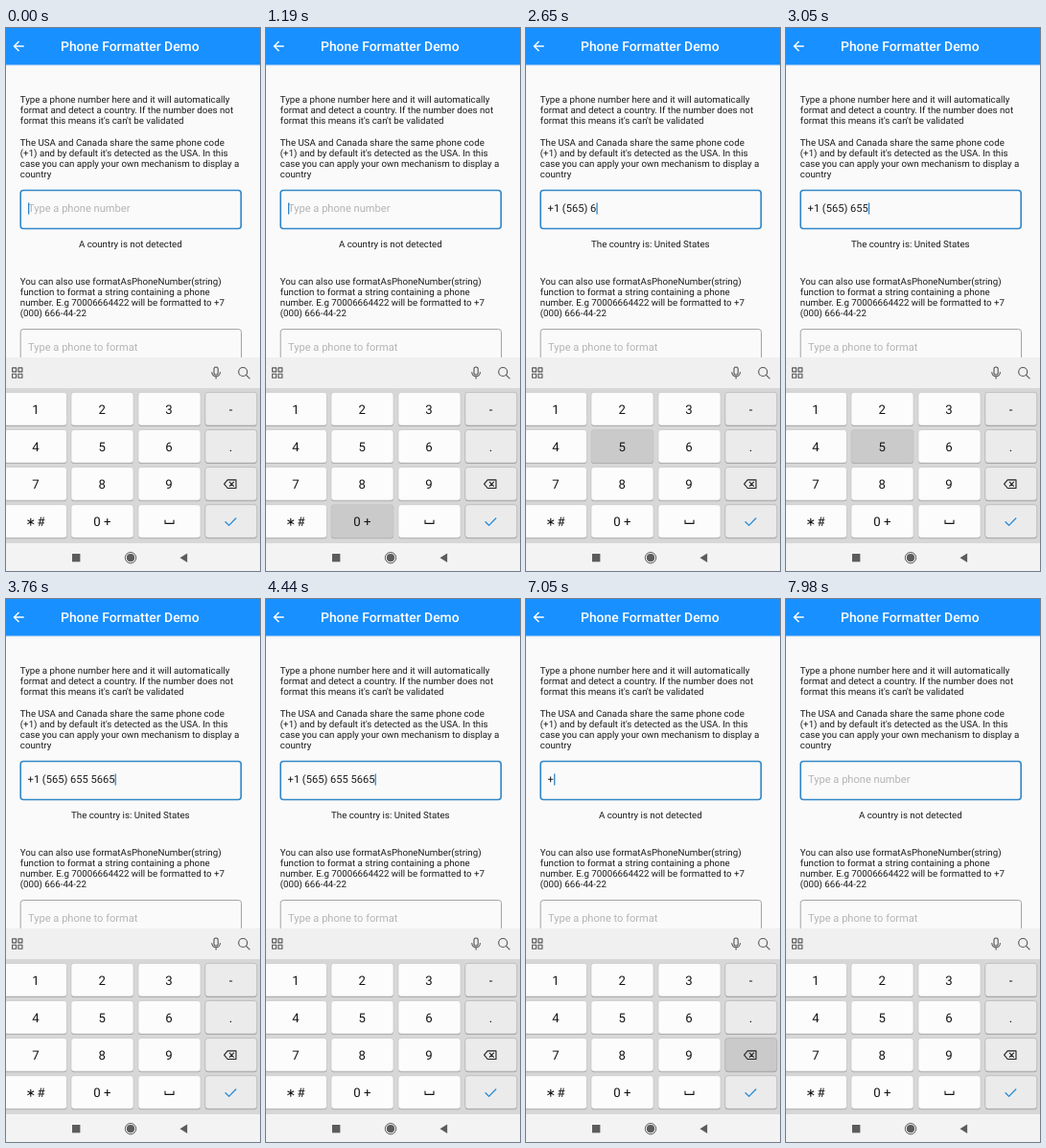
Recreate the animation shown at these times as an HTML page. Size 265 px wide and 567 px high, loop 8000 ms.

```html
<!DOCTYPE html>
<html lang="en">
<head>
<meta charset="utf-8">
<title>Phone Formatter Demo</title>
<style>
html, body { margin: 0; width: 100%; height: 100%; overflow: hidden; background: #fafafa; }
svg { display: block; width: 100%; height: 100%; }
text { font-family: Roboto, sans-serif; text-rendering: geometricPrecision; white-space: pre; }
.title { font-size: 13.9px; font-weight: 500; fill: #fff; }
.body { font-size: 9.72px; fill: #1c1c1c; }
.field { font-size: 11.1px; fill: #1c1c1c; }
.hint { fill: #b4b4b4; }
.label { font-size: 13.2px; fill: #151515; text-anchor: middle; }
.line { fill: none; stroke: #555; stroke-width: 1.1; stroke-linecap: round; stroke-linejoin: round; }
.mid { text-anchor: middle; }
</style>
</head>
<body>
<svg id="stage" viewBox="0 0 265 567">
  <rect width="265" height="567" fill="#fafafa"/>
  <rect y="38" width="265" height="2" fill="#eef0f2"/>
  <rect width="265" height="38.5" fill="#1890ff"/>
  <path d="M18.7 19H8.5M13.5 14L8.5 19L13.5 24" fill="none" stroke="#fff" stroke-width="1.5"/>
  <text class="title" x="57" y="23.8">Phone Formatter Demo</text>
  <g id="copy"></g>

  <rect x="15.2" y="169.5" width="230" height="40" rx="3" fill="none" stroke="#3187c8" stroke-width="1.6"/>
  <text id="hint" class="field hint" x="23" y="192.2">Type a phone number</text>
  <text id="value" class="field" x="22.6" y="192.2"></text>
  <rect id="caret" y="182.5" width="1.3" height="12" fill="#2f86c8"/>
  <text id="country" class="body mid" x="129.8" y="229"></text>

  <rect x="15.2" y="314.5" width="230.3" height="41" rx="3" fill="none" stroke="#a3a3a3"/>
  <text class="field hint" x="23" y="337.2">Type a phone to format</text>

  <rect y="344" width="265" height="32" fill="#f0f0f1"/>
  <rect y="376" width="265" height="162" fill="#d7d7d8"/>
  <rect y="538" width="265" height="29" fill="#f3f3f4"/>
  <g class="line">
    <path d="M6.6 354.9h4v4h-4zM12.9 354.9h4v4h-4zM6.6 361.2h4v4h-4zM12.9 361.2h4v4h-4z"/>
    <rect x="217" y="354" width="4.2" height="8" rx="2.1"/>
    <path d="M214.8 359.5a4.3 4.3 0 0 0 8.6 0M219.1 364v2"/>
    <circle cx="247.2" cy="359" r="4.5"/>
    <path d="M250.5 362.3l3.6 3.6"/>
  </g>
  <g id="keys"></g>
  <g class="line" stroke-width="1.2">
    <path d="M25.8 512.3v7M22.8 514l6 3.6M28.8 514l-6 3.6" stroke="#151515"/>
    <path d="M166 514v3.4h9v-3.4" stroke="#151515"/>
    <path d="M227.6 476.2l3.6-4.3h8.8v8.6h-8.8zM233.3 474.1l4.2 4.2M237.5 474.1l-4.2 4.2" stroke="#222"/>
    <path d="M229 515.8l3.6 3.6l7.2-7.4" stroke="#258bd2" stroke-width="1.3"/>
  </g>
  <rect x="69" y="549" width="8.4" height="8.4" fill="#5c5c5c"/>
  <circle cx="130" cy="553.2" r="5.7" fill="none" stroke="#5c5c5c"/>
  <circle cx="130" cy="553.2" r="4.1" fill="#5c5c5c"/>
  <path d="M181.5 553.2l7.6-4.7v9.4z" fill="#5c5c5c"/>
</svg>
<script>
const LOOP = 8000;
const $ = id => document.getElementById(id);

function add(parent, tag, attrs, content = '') {
  const node = document.createElementNS('http://www.w3.org/2000/svg', tag);
  for (const name in attrs) node.setAttribute(name, attrs[name]);
  node.textContent = content;
  parent.append(node);
  return node;
}

const paragraphs = [
  [78.2, ['Type a phone number here and it will automatically',
    'format and detect a country. If the number does not',
    "format this means it's can't be validated"]],
  [122.6, ['The USA and Canada share the same phone code',
    "(+1) and by default it's detected as the USA. In this",
    'case you can apply your own mechanism to display a',
    'country']],
  [267.6, ['You can also use formatAsPhoneNumber(string)',
    'function to format a string containing a phone',
    'number. E.g 70006664422 will be formatted to +7',
    '(000) 666-44-22']]
];
for (const [top, lines] of paragraphs)
  lines.forEach((line, i) => add($('copy'), 'text', { class: 'body', x: 14.8, y: top + i * 11.1 }, line));

// Keypad; the keys named by a word carry a drawn icon instead of a label.
const columns = [[-2, 65.5, 31], [68, 65, 100.3], [138, 65, 170], [207.8, 54, 234.5]];
const rows = [['1', '2', '3', '-'], ['4', '5', '6', '.'], ['7', '8', '9', 'delete'], ['star', '0 +', 'space', 'enter']];
const keys = {};
rows.forEach((names, r) => names.forEach((name, c) => {
  const [x, width, middle] = columns[c];
  const y = 380.4 + r * 39.1;
  const box = { x, width, height: 34.6, rx: 3 };
  add($('keys'), 'rect', { ...box, y: y + 1, fill: '#a6a6a7' });
  const [fill, stroke] = c === 3 ? ['#ebebec', '#a9a9aa'] : ['#fcfcfc', '#c2c2c3'];
  const face = add($('keys'), 'rect', { ...box, y, fill, stroke, 'stroke-width': .6 });
  keys[name] = { face, fill };
  if (name.length <= 3)
    add($('keys'), 'text', { class: 'label', x: middle, y: y + 22.1 }, name);
}));
add($('keys'), 'text', { class: 'label', x: 36.6, y: 519.8 }, '#');

// Each press: key, down, up. A character is typed on release.
const presses = [
  ['0 +', 800, 1300], ['1', 1510, 1600],
  ['5', 1640, 1720], ['6', 1760, 1840], ['5', 1880, 1970], ['6', 2090, 2180],
  ['5', 2650, 2740], ['5', 2850, 2960], ['5', 3050, 3160],
  ['6', 3190, 3260], ['6', 3280, 3350], ['5', 3370, 3430],
  ['delete', 4790, 5050], ['delete', 5260, 5410], ['delete', 5780, 7190],
  ['7', 7890, 7980]
];
const typed = presses.slice(0, 12).map(([key, , up]) => [up, key === '0 +' ? '+' : key]);
const erased = [5050, 5410, ...Array.from({ length: 10 }, (_, i) => 6360 + i * 84)];
const blinkStarts = [-220, ...typed.map(step => step[0]), ...erased, 5900, 7250];

function format(raw) {
  const area = raw.slice(2, 5), exchange = raw.slice(5, 8), line = raw.slice(8);
  return raw.slice(0, 2) + (area && ' (' + area) + (exchange && ') ' + exchange) + (line && ' ' + line);
}

function draw(t) {
  const all = typed.filter(step => step[0] <= t).map(step => step[1]).join('');
  const raw = all.slice(0, all.length - erased.filter(time => time <= t).length);
  $('value').textContent = format(raw);
  $('hint').style.display = raw ? 'none' : '';
  $('country').textContent = raw.length > 1 ? 'The country is: United States' : 'A country is not detected';

  const start = Math.max(...blinkStarts.filter(time => time <= t));
  $('caret').style.display = (t - start) % 1000 < 500 ? '' : 'none';
  $('caret').setAttribute('x', raw ? 22.8 + $('value').getComputedTextLength() : 23);

  const held = presses.find(([, down, up]) => t >= down && t < up);
  for (const name in keys)
    keys[name].face.setAttribute('fill', held && held[0] === name ? '#cacacb' : keys[name].fill);
}

const begin = performance.now();
function tick() {
  draw((performance.now() - begin) % LOOP);
  requestAnimationFrame(tick);
}
tick();
</script>
</body>
</html>
```
